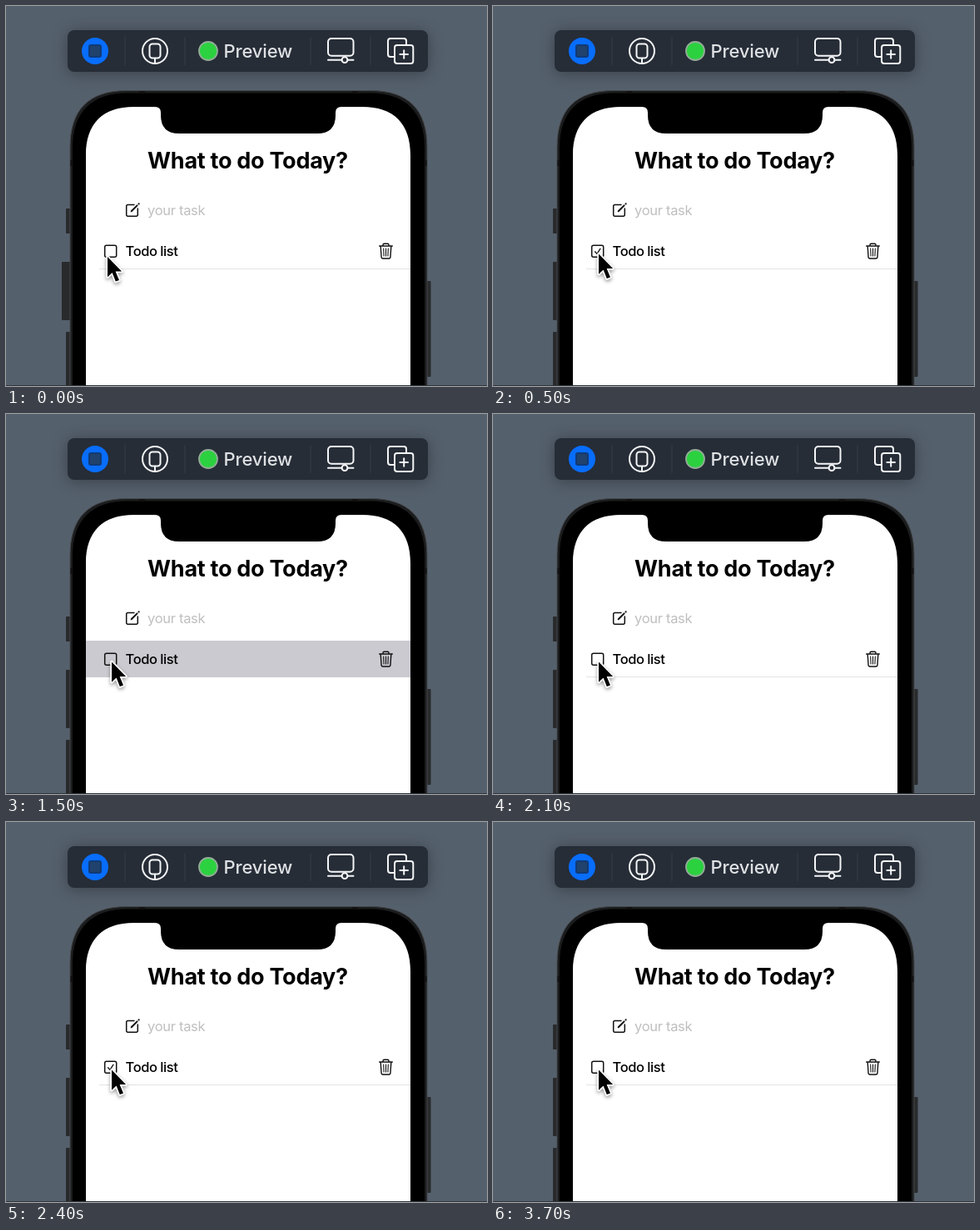
Write an HTML page that moves like this. It is 578x456 px and loops after 3800 ms.

```html
<!DOCTYPE html>
<html lang="en">
<head>
<meta charset="utf-8">
<title>Todo preview</title>
<style>
  html, body { margin: 0; width: 100%; height: 100%; overflow: hidden; background: #55606d; }
  svg { display: block; width: 578px; height: 456px; }
  text { font-family: Inter, "Liberation Sans", sans-serif; }
  .line { fill: none; stroke-linecap: round; stroke-linejoin: round; }
  .tool { stroke: #f4f5f6; stroke-width: 2; }
  .ink { stroke: #111; stroke-width: 1.5; }
  .toolbar { filter: drop-shadow(0 2px 9px #0005); }
  #cursor { filter: drop-shadow(0 2px 2px #0006); }
</style>
</head>
<body>
<svg viewBox="0 0 578 456">
  <rect width="578" height="456" fill="#55606d"/>

  <!-- Toolbar -->
  <rect class="toolbar" x="74" y="29" width="433" height="50" rx="8" fill="#262d37"/>
  <path d="M143 37V71M215 37V71M366 37V71M438 37V71" stroke="#313943" stroke-width="1.5"/>
  <circle cx="107" cy="54" r="16" fill="#086dfb"/>
  <rect x="100" y="47" width="14" height="14" rx="2" fill="#20426c" stroke="#103a78" stroke-width="2"/>
  <g class="line tool">
    <circle cx="179" cy="54" r="15"/>
    <rect x="172.5" y="45.5" width="13" height="17" rx="3.5"/>
    <path d="M179 63V69"/>
    <rect x="387" y="39" width="30.5" height="20.7" rx="4"/>
    <path d="M387 64.7H403.5M410.5 64.7H417.5"/>
    <circle cx="407" cy="64.7" r="3.4"/>
    <path d="M466 61H462Q459 61 459 58V42Q459 39 462 39H478Q481 39 481 42V46"/>
    <rect x="467" y="47" width="22.3" height="22" rx="3"/>
    <path d="M478.2 53.2V62.8M473.4 58H483"/>
  </g>
  <circle cx="243" cy="54" r="11" fill="#2bd13f" stroke="#93ad98" stroke-width="1.8"/>
  <text x="261.5" y="62" font-size="22" font-weight="500" letter-spacing="-.15" fill="#dfe1e4">Preview</text>

  <!-- Phone -->
  <g fill="#292a2c">
    <rect x="72" y="243" width="6" height="30" rx="1"/>
    <rect id="volume" x="72" y="307" width="6" height="70" rx="1"/>
    <rect x="72" y="391" width="6" height="66" rx="1"/>
    <rect x="505" y="330" width="5.5" height="115" rx="1"/>
  </g>
  <path d="M77 457V169C77 124 100 101.5 145 101.5H438C483 101.5 506 124 506 169V457Z" fill="#1b1c1e" stroke="#48494b"/>
  <path d="M80 457V170C80 127 103 104.5 146 104.5H437C480 104.5 503 127 503 170V457Z"/>
  <path d="M160 103.5H167M416 103.5H423M79 185V192M504 185V192" stroke="#111" stroke-width="3"/>
  <path d="M96 457V179C96 141 116 121 154 121H179Q186 121 186 128V131Q186 153 208 153H374Q396 153 396 131V128Q396 121 403 121H428C466 121 486 141 486 179V457Z" fill="#fff"/>

  <!-- App -->
  <text x="290.5" y="195" font-size="27" font-weight="700" letter-spacing="-.27" text-anchor="middle">What to do Today?</text>
  <text x="170" y="250.7" font-size="16.5" letter-spacing="-.3" fill="#bfbfc1">your task</text>
  <path d="M112 315.5H486" stroke="#e3e3e5"/>
  <rect id="highlight" x="96" y="272" width="390" height="44" fill="#cbcad0"/>
  <text x="143.6" y="300.3" font-size="16.5" font-weight="500" letter-spacing="-.45">Todo list</text>
  <g class="line ink">
    <path d="M154 238.5H146.5Q144.7 238.5 144.7 240.3V250.5Q144.7 252.2 146.5 252.2H156.5Q158.3 252.2 158.3 250.5V243"/>
    <path d="M150.7 246.3L157.6 239.4M159.5 237.5L159.7 237.3" stroke-width="2"/>
    <rect x="118.7" y="287.2" width="14" height="14" rx="2"/>
    <path id="check" d="M122.6 294.8L125 297.4L129 291.2" stroke-width="1.3"/>
    <path d="M448.7 288H464.3M453 287.5V286.7Q453 285.3 454.3 285.3H458.7Q460 285.3 460 286.7V287.5M450.2 288.5L451.1 301.6Q451.3 303 453 303H460Q461.7 303 461.9 301.6L462.8 288.5" stroke-width="1.4"/>
    <path d="M453.7 291L454.1 300M456.5 291V300M459.3 291L458.9 300" stroke-width="1.1"/>
  </g>

  <path d="M0 455.5H578" stroke="#30353c"/>
  <path id="cursor" d="M0 0V24.2L5.6 18.9L9.8 29.6L14 27.9L9.6 17.5H17.1Z"
    stroke="#fff" stroke-width="3.4" stroke-linejoin="round" paint-order="stroke"/>
</svg>
<script>
const LOOP = 3800, STEP = 100;
const [volume, highlight, check, cursor] =
  ["volume", "highlight", "check", "cursor"].map(id => document.getElementById(id));

// Each tap toggles the task, holds the row tint, then fades it.
const taps = [
  { at: 300, hold: 100 },
  { at: 1400, hold: 200 },
  { at: 2200, hold: 100 },
  { at: 3000, hold: 200 }
];

function tint(t, { at, hold }) {
  return Math.max(0, Math.min(1, 1 - (t - at - hold + STEP) / (2 * STEP)));
}

function draw(now) {
  const t = Math.floor(now % LOOP / STEP) * STEP;
  const started = t >= STEP;
  const done = taps.filter(tap => t >= tap.at);
  const last = done[done.length - 1];
  check.style.display = done.length % 2 ? "" : "none";
  highlight.style.opacity = last ? tint(t, last) : 0;
  volume.setAttribute("x", started ? 72 : 67);
  volume.setAttribute("width", started ? 6 : 11);
  cursor.setAttribute("transform", started ? "translate(127 297.5)" : "translate(122 301)");
}

const start = performance.now();
function tick() {
  draw(performance.now() - start);
  requestAnimationFrame(tick);
}
tick();
</script>
</body>
</html>
```
